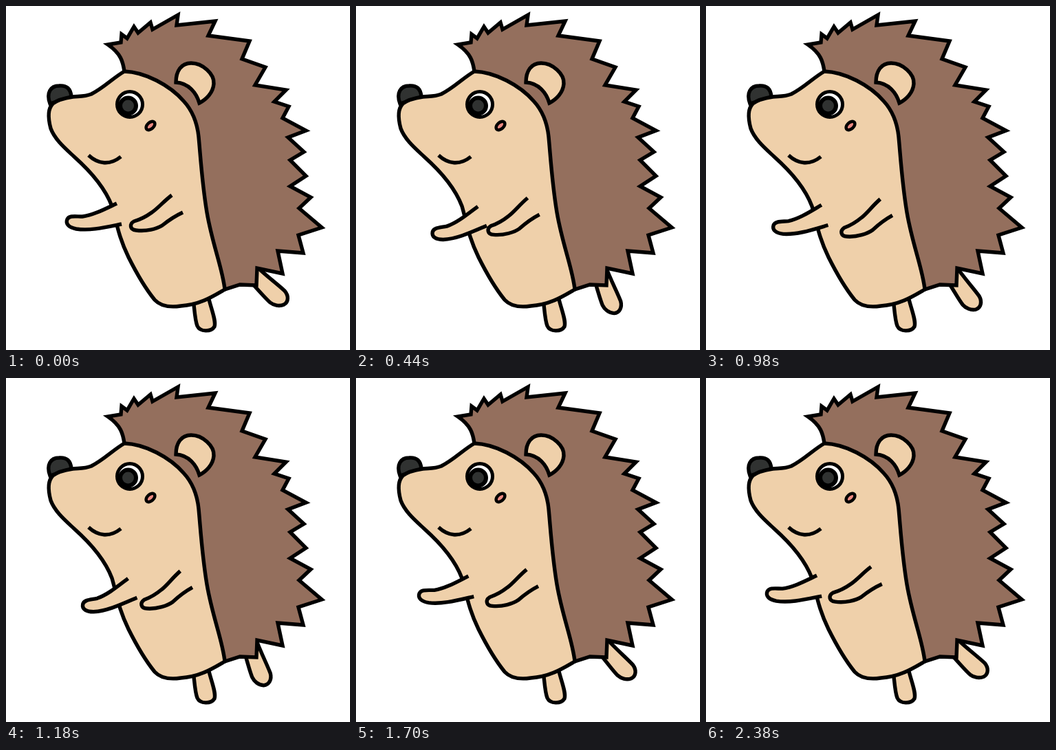
These frames come from a looping animation (500 by 500 pixels, 2.4 s). An HTML page with a canvas:

```html
<!DOCTYPE html>
<html lang="en">
<head>
<meta charset="utf-8">
<title>Walking hedgehog</title>
<style>
html, body { margin: 0; width: 100%; height: 100%; overflow: hidden; background: #fff; }
canvas { display: block; width: 500px; height: 500px; }
</style>
</head>
<body>
<canvas id="stage" width="500" height="500"></canvas>
<script>
const ctx = document.getElementById('stage').getContext('2d');
const PERIOD = 800;
const STEP = 20;
const SKIN = '#efd0aa';
const BROWN = '#946f5d';
const DARK = '#303231';

const shapes = {
  spines: `M172 95 C170 81 167 69 148 56 L167 53 L168 41 L176 47 L186 30 L192 39
    L210 24 L213 34 L250 13 L248 28 L304 22 L294 43 L354 51 L343 77 L377 89
    L362 115 L407 122 L390 139 L411 146 L402 163 L436 181 L410 191 L433 212
    L413 224 L436 247 L413 262 L443 278 L426 294 L459 322 L425 333 L432 359
    L395 356 L402 389 L365 381 L364 406 L340 405 L318 412
    C314 385 200 300 172 95 Z`,
  body: `M172 95 C155 105 142 119 124 128 C114 132 105 131 97 132 C84 134 74 137 68 142
    C61 149 61 163 65 178 C71 194 85 206 99 219 C126 243 145 267 154 291
    C161 315 163 334 178 365 C190 389 203 411 216 427 C225 437 240 438 254 436
    C282 434 299 423 318 412 C315 382 300 347 292 300 C285 258 283 222 280 190
    C278 171 272 153 258 138 C238 115 202 96 172 95 Z`,
  nose: 'M64 142 C58 126 65 116 77 116 C88 115 94 120 95 132 Z',
  ear: `M247 111 C247 94 255 83 269 83 C286 83 303 99 302 113 C301 126 291 136 281 141
    C277 127 266 112 247 111 Z`,
  mouth: 'M120 217 C134 230 151 232 167 219',
  frontLeg: 'M271 418 C274 437 274 455 278 465 C282 474 298 474 303 466 C306 457 297 438 293 418',
  backLeg: 'M358 373 C380 394 392 402 405 414 C411 421 411 430 404 434 C397 437 389 435 384 431 C376 424 370 416 349 394',
  leftArm: 'M161 287 C144 295 127 304 111 306 C101 306 92 304 89 310 C86 317 92 322 102 324 C122 327 143 322 168 317',
  rightArm: 'M241 275 C229 284 221 294 212 300 C201 308 193 311 186 313 C179 317 180 325 189 326 C204 328 219 324 227 319 C237 311 246 305 257 300'
};
for (const name in shapes) shapes[name] = new Path2D(shapes[name]);

function paint(path, fill, width = 5.4) {
  if (fill) {
    ctx.fillStyle = fill;
    ctx.fill(path);
  }
  ctx.lineWidth = width;
  ctx.stroke(path);
}

function ellipse(x, y, rx, ry, fill, width, tilt = 0) {
  const path = new Path2D();
  path.ellipse(x, y, rx, ry, tilt, 0, Math.PI * 2);
  paint(path, fill, width);
}

function limb(path, x, y, angle) {
  ctx.save();
  ctx.translate(x, y);
  ctx.rotate(angle);
  ctx.translate(-x, -y);
  paint(path, SKIN);
  ctx.restore();
}

function swing(phase) {
  return (1 - Math.cos(phase * Math.PI * 2)) / 2;
}

function drawFace() {
  ellipse(180, 143, 18.5, 18.5, '#fff', 5);
  ellipse(177.5, 145, 11.5, 11.5, DARK, 6);
  ellipse(210, 174, 7.5, 4.7, '#ee8a82', 4.5, -0.75);
  paint(shapes.mouth);
}

function draw(time) {
  const phase = (time % PERIOD) / PERIOD;
  const stride = swing(phase);
  const lead = 0.15;

  ctx.fillStyle = '#fff';
  ctx.fillRect(0, 0, 500, 500);
  ctx.strokeStyle = '#000';
  ctx.lineJoin = 'miter';

  limb(shapes.backLeg, 362, 377, 0.46 * stride);
  paint(shapes.frontLeg, SKIN);
  paint(shapes.spines, BROWN);
  paint(shapes.nose, DARK);
  paint(shapes.body, SKIN);
  paint(shapes.ear, SKIN);
  drawFace();
  limb(shapes.leftArm, 190, 211, -0.21 * stride);
  limb(shapes.rightArm, 329, 99, -0.106 * (swing(phase + lead) - swing(lead)));
}

const start = performance.now();
function tick() {
  const elapsed = performance.now() - start;
  draw(Math.floor(elapsed / STEP) * STEP);
  requestAnimationFrame(tick);
}
tick();
</script>
</body>
</html>
```
